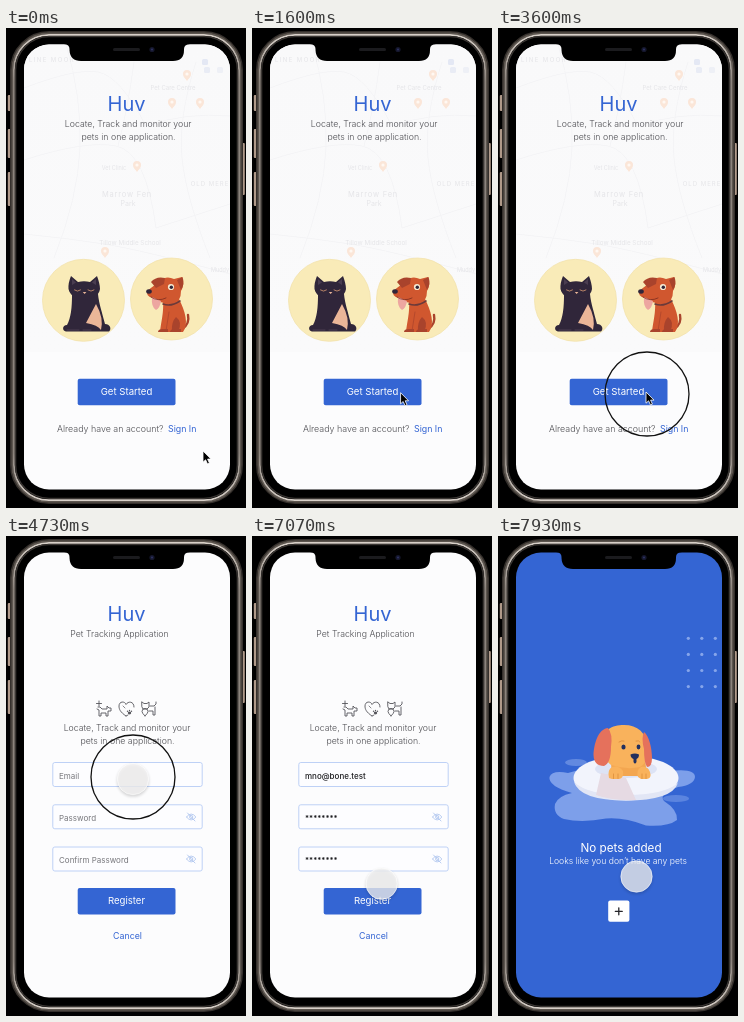
These frames come from a looping animation (240x480 px, 8 s). An HTML page:

```html
<!DOCTYPE html>
<html lang="en">
<head>
<meta charset="utf-8">
<title>Pet tracking app</title>
<style>
  html, body { margin: 0; width: 100%; height: 100%; overflow: hidden; background: #000; }
  svg { display: block; width: 100vw; height: 100vh; font-family: Inter, "Open Sans", sans-serif; }
</style>
</head>
<body>
<svg id="stage" viewBox="0 0 240 480"></svg>
<script>
const BLUE = '#3465d3', INK = '#505055', PAPER = '#fcfcfd';
const stage = document.getElementById('stage');

const text = (s, x, y, size, fill = INK, anchor = 'middle', weight = 300, extra = '') =>
  `<text x="${x}" y="${y}" font-size="${size}" fill="${fill}" text-anchor="${anchor}" font-weight="${weight}" ${extra}>${s}</text>`;
const path = (d, fill, extra = '') => `<path d="${d}" fill="${fill}" ${extra}/>`;
const line = (d, stroke, width = 1) =>
  path(d, 'none', `stroke="${stroke}" stroke-width="${width}" stroke-linecap="round" stroke-linejoin="round"`);
const rect = (x, y, w, h, r, fill, extra = '') =>
  `<rect x="${x}" y="${y}" width="${w}" height="${h}" rx="${r}" fill="${fill}" ${extra}/>`;
const oval = (x, y, rx, ry, fill, extra = '') =>
  `<ellipse cx="${x}" cy="${y}" rx="${rx}" ry="${ry}" fill="${fill}" ${extra}/>`;
const dot = (x, y, r, fill, extra) => oval(x, y, r, r, fill, extra);
const group = (id, body, extra = '') => `<g id="${id}" ${extra}>${body}</g>`;
const backdrop = color => rect(17, 15, 208, 448, 0, color);

const button = (label, y, base) =>
  rect(71.7, y, 97.8, 26.6, 2, BLUE) + text(label, 120.5, base, 9.6, '#fff', 'middle', 400);

const pin = (x, y) =>
  path(`M${x} ${y + 6}C${x - 2} ${y + 3} ${x - 4} ${y + 2} ${x - 4} ${y - 1}a4 4 0 0 1 8 0C${x + 4} ${y + 2} ${x + 2} ${y + 3} ${x} ${y + 6}Z`, '#fbe6d8') +
  dot(x, y - 1, 1.6, '#fff8f2');

function map() {
  const label = (s, x, y, size, extra) => text(s, x, y, size, '#e5e5e8', 'middle', 400, extra);
  const roads = 'M18 60Q70 40 92 44T140 98Q180 84 224 88M60 16Q76 70 74 120T48 230M18 132Q80 112 110 118T150 200L224 176M128 34Q122 80 112 118M190 34Q172 90 176 130T204 230M18 206Q60 210 98 216T224 246';
  return rect(17, 15, 208, 309, 0, 'url(#mapFill)') +
    line(roads, '#f4f4f6', 1) +
    label('LINE MOOR', 46, 34, 6, 'letter-spacing="1.4"') +
    label('OLD MERE', 204, 158, 6, 'letter-spacing="1"') +
    label('Marrow Fen', 121, 169, 7.5, 'letter-spacing=".8"') +
    label('Park', 122, 178, 7) +
    label('Tillow Middle School', 124, 217, 6.3) +
    label('Pet Care Centre', 167, 62, 6) +
    label('Vet Clinic', 108, 142, 5.5) +
    label('Muddy', 214, 244, 5.5) +
    pin(181, 47) + pin(166, 75) + pin(194, 75) + pin(131, 138) + pin(99, 224) +
    rect(196, 31, 6, 6, 1.5, '#e4e8f4') + rect(198, 39, 6, 6, 1.5, '#e9ecf5') + rect(211, 39, 6, 6, 1.5, '#eef0f6');
}

function cat() {
  const dark = '#30263a', peach = '#ebb698';
  return dot(77.5, 272.3, 41, '#f9ebb8', 'stroke="#f3e3ad" stroke-width=".8"') +
    path('M66 267C66 279 65 290 61 297C56 297 56 303 60 303.5H103C106 301 104 296 99 296C96 284 93 276 92 266Z', dark) +
    path('M90 276L80 295Q92 297 95 302Q98 290 90 276Z', peach) +
    path('M65 248L72 254Q78 252.5 84 254L91 248Q94 256 94 261C93 268 86 271.5 78.5 271.5S64 268 62.5 261Q62 255 65 248Z', dark) +
    path('M66 251L70 254.5L66 257Z M90 251L86 254.5L90 257Z', '#4a3d50') +
    line('M68.5 262q3 2.4 6 0M82 262q3 2.4 6 0', '#d99a72', .8) +
    path('M76.8 264h3.6l-1.8 2Z', peach) +
    line('M61 302h12M77 302h8', '#5b4c60', .6);
}

function dog() {
  const red = '#d0572f', deep = '#a9432c';
  return dot(165.5, 271, 41, '#f9ebb8', 'stroke="#f3e3ad" stroke-width=".8"') +
    line('M176 301Q184 296 182 287', deep, 2.4) +
    path('M157 273C158 284 155 294 154 304H177C183 296 179 283 173 271Z', red) +
    path('M170 289Q177 294 172 304H166Q165 294 170 289Z', deep) +
    line('M163 284L160 303', deep, .7) +
    path('M141 263L154 253Q160 247 168 251L176 249Q179 256 175 263Q175 273 168 275Q156 277 146 270Q140 268 141 263Z', red) +
    path('M158 256L159 250Q150 248 145 254L150 260Z', deep) +
    path('M171 252L176.5 249Q179 256 175 262Z', deep) +
    path('M146 269L155 273Q154 280 150 282Q145 279 146 269Z', '#eda6a0') +
    oval(143, 263.5, 2.8, 2.2, '#30263a') +
    dot(165, 259, 3.1, '#f7ead2') + dot(165.3, 259.2, 1.7, '#30263a') +
    line('M145 269Q152 274 160 270', '#71291f', .7) +
    line('M157 276Q165 279 174 273', '#6b3a3a', 1.6) +
    path('M152 304q0-3 5-3h5v3ZM164 304q0-3 5-3h6v3Z', deep);
}

const welcome = () => backdrop(PAPER) + map() +
  text('Huv', 120.5, 83, 20, BLUE, 'middle', 400) +
  text('Locate, Track and monitor your', 122.2, 99, 8.75) +
  text('pets in one application.', 122.5, 112, 8.75) +
  cat() + dog() + button('Get Started', 350.7, 367.2) +
  text('Already have an account?', 51, 404, 8.9, INK, 'start') +
  text('Sign In', 162, 404, 8.8, BLUE, 'start', 400);

function petIcons() {
  const c = '#56565c';
  const paw = (x, y) => oval(x, y + 1, 1.7, 1.4, c) + [-2, 0, 2].map(d => dot(x + d, y - 1.6 + Math.abs(d) * .4, .7, c)).join('');
  return line('M92 171h2l2 2h5v-3l2 2h2v3h-3v5h-2v-3h-5v3h-2v-6l-2 -1M93 165v5M90.5 167.5h5', c, .9) +
    line('M120 180C114 176 113 173 113 170C113 165 119 165 120 168.5C122 165 128 165 128 171M120 180l2 -1', c, .9) +
    paw(123.5, 176) + line('M117 170l2 2', c, .7) +
    line('M136 166l2 1.5h3l2 -1.5v5l-2 2h-4l-1 -2ZM144 170h4l2 -2v-2M149 171v8h-2v-4h-4M139 180q-3 -3 -3 -4.5a3 3 0 0 1 6 0q0 1.5 -3 4.5', c, .9);
}

const eye = y =>
  line(`M180.5 ${y}q4.7 -6 9.4 0q-4.7 6 -9.4 0M181.5 ${y - 4}l7.5 8`, '#a9c0ee', .8) +
  dot(185.2, y, 1.6, 'none', 'stroke="#a9c0ee" stroke-width=".8"');

const field = (id, hint, value, y, base, size = 8, weight = 500) =>
  rect(46.8, y, 149.4, 24, 2, '#fdfdff', 'stroke="#b7ccf5" stroke-width=".9"') +
  group(id + 'Hint', text(hint, 53, base, 8, '#77777c', 'start', 400)) +
  group(id + 'Value', text(value, 53, base, size, '#1d1d20', 'start', weight));

const register = () => backdrop(PAPER) +
  text('Huv', 120.5, 85, 20, BLUE, 'middle', 400) +
  text('Pet Tracking Application', 113.5, 101, 8.75) + petIcons() +
  text('Locate, Track and monitor your', 121, 195, 8.75) +
  text('pets in one application.', 121.5, 207.8, 8.75) +
  field('email', 'Email', 'mno@bone.test', 226.5, 242.7) +
  field('pass', 'Password', '********', 268.8, 284.7, 7.3, 700) + eye(281) +
  field('confirm', 'Confirm Password', '********', 311, 326.8, 7.3, 700) + eye(323) +
  button('Register', 352, 368.4) +
  text('Cancel', 121.5, 402.5, 8.8, BLUE, 'middle', 400);

function puppy() {
  const pool = '#7d9fea', tan = '#f9b25c', coral = '#e5715c';
  return path('M51.5 241Q54 234 70 237L92 231Q130 222 172 235Q197 232 197 241Q196 249 180 251Q160 258 166 265Q180 274 179 284Q170 291 148 289.5Q126 281 108 282.5Q84 287 66 283Q55 279 57 268Q60 260 74 257Q50 250 51.5 241Z', pool) +
    oval(78, 226.5, 11, 3.5, '#6289e0') + oval(178, 262.5, 13, 3.6, '#5b84df') +
    oval(128, 242, 52.5, 22.5, '#f2f4fc') +
    path('M76 246Q90 259 128 259T180 247Q174 264.5 128 264.5T76 246Z', '#e2e6f5') +
    oval(128, 233, 31, 9, '#dde3f5') +
    path('M103 237L128 242L138 264Q114 265 98 259Z', '#e6dae3') +
    path('M112 214H146L149 240H114Z', '#f3a650') +
    path('M103 208C104 194 114 189 126 189C140 189 148 197 149 209Q151 226 142 231Q128 234 113 229Q103 222 103 208Z', tan) +
    path('M110 192C100 193 96 208 95.5 219Q96 230 106 230Q113 227 113 211Q115 198 110 192Z', coral) +
    path('M146 196C151 200 154 212 154 222Q154 231 149 231Q146 227 146 213Q143 202 146 196Z', coral) +
    oval(125.5, 211, 2.1, 2.5, '#24305e') + oval(140.5, 211, 1.9, 2.4, '#24305e') +
    line('M121 206q3 -2 5 -1M138 205q3 -1 4 1', '#d98a3c', .8) +
    path('M132.5 218.5Q137 216.5 141 218.5Q141 222 138.5 223V226Q137 229 135.5 226V223Q132.5 221.5 132.5 218.5Z', '#24305e') +
    path('M111 242Q109 234 114 231Q121 229 125 235Q126 242 121 243H114ZM140 241Q138 234 143 231Q150 230 152 236Q154 242 149 243H143Z', tan) +
    line('M115.5 238v4.5M120 238v4.5M144 238v4.5M148 238v4.5', '#dc8e3c', .8);
}

function empty() {
  let grid = '';
  for (let i = 0; i < 12; i++) grid += dot(190.3 + i % 3 * 13.5, 102.3 + Math.floor(i / 3) * 16.1, 1.6, '#86a5ea');
  return backdrop(BLUE) + grid + puppy() +
    text('No pets added', 123, 315.5, 11.7, '#fff', 'middle', 400) +
    text('Looks like you don’t have any pets', 120, 328, 8.65, '#fff') +
    rect(110.2, 364.6, 21.2, 21.2, 2, '#fff') + line('M117.3 375.3h7M120.8 371.8v7', '#26262b', 1.3);
}

// One rounded outline of the phone body, drawn inwards from its edge.
const rim = (inset, width, color) =>
  rect(4 + inset, 3 + inset, 233 - 2 * inset, 473 - 2 * inset, 39 - inset, '#000', `stroke="${color}" stroke-width="${width}"`);

const phone = () => rect(0, 0, 240, 480, 0, '#000') +
  [[67, 16], [101, 29], [144, 34]].map(([y, h]) => rect(1.8, y, 3, h, 1, '#b09a8a')).join('') +
  rect(236.2, 115, 2.6, 52, 1, '#b09a8a') +
  rim(.7, 1.4, '#35302c') + rim(2.2, 1.8, '#5d564f') + rim(3.9, 1.8, 'url(#metal)') + rim(5.6, 1.4, '#3a3633');

const notch = () =>
  path('M58 15V16Q63.5 16.5 63.5 21V22Q64 33 75 33H167Q178 33 178 22V21Q178 16.5 184 16V15Z', '#000') +
  rect(107, 20, 27, 3, 1.5, '#1b1b1e') + dot(146, 21.5, 2.6, '#15172c') + dot(146, 21.5, 1.1, '#2c3160');

stage.innerHTML = `<defs>
  <clipPath id="screen">${rect(18, 16.5, 206, 445, 25, '#fff')}</clipPath>
  <linearGradient id="mapFill" x2="0" y2="1"><stop stop-color="#f9f9fa"/><stop offset="1" stop-color="#fafafb"/></linearGradient>
  <linearGradient id="metal" x2="0" y2="1"><stop stop-color="#d8d0c8"/><stop offset=".1" stop-color="#8b837c"/><stop offset=".9" stop-color="#8b837c"/><stop offset="1" stop-color="#d8d0c8"/></linearGradient>
  <filter id="soft" x="-50%" y="-50%" width="200%" height="200%"><feGaussianBlur stdDeviation="1.6"/></filter>
</defs>` + phone() +
  `<g clip-path="url(#screen)">` + group('welcome', welcome()) + group('register', register()) + group('empty', empty()) + '</g>' + notch() +
  group('touch', dot(0, 1.6, 16, '#000', 'opacity=".16" filter="url(#soft)"') +
    dot(0, 0, 15.7, '#f4f3f3', 'fill-opacity=".76" stroke="#fff" stroke-opacity=".6" stroke-width="1"')) +
  group('arrow', path('M0 0V11.2L2.6 8.8L4.5 13L6.4 12.1L4.6 8.1H8Z', '#000', 'stroke="#fff" stroke-width=".8"')) +
  `<circle id="ring" r="42" fill="none" stroke="#111" stroke-width="1.3"/>`;

const LOOP = 8000;
const ARROW = [[0, 197, 423], [800, 165, 384], [1700, 148, 364]];
const TOUCH = [[0, 149, 368], [4400, 149, 368], [4530, 127, 243], [5330, 127, 243], [5730, 127, 284],
  [6399, 127, 284], [6400, 127, 337], [6530, 127, 325], [6930, 127, 325], [7200, 132, 367.5], [7480, 132, 367.5], [7860, 138.5, 340.5]];
const TAPS = [3530, 4730, 5930, 6600, 7200];

const ramp = (t, from, to) => Math.min(1, Math.max(0, (t - from) / (to - from)));
const smooth = p => p * p * (3 - 2 * p);
const $ = id => document.getElementById(id);
const fade = (id, value) => $(id).setAttribute('opacity', value);
const move = (id, [x, y]) => $(id).setAttribute('transform', `translate(${x} ${y})`);

function along(keys, t) {
  let i = 0;
  while (i < keys.length - 2 && t >= keys[i + 1][0]) i++;
  const [a, ax, ay] = keys[i], [b, bx, by] = keys[i + 1];
  const p = smooth(ramp(t, a, b));
  return [ax + (bx - ax) * p, ay + (by - ay) * p];
}

function fill(id, p) {
  fade(id + 'Hint', 1 - p);
  fade(id + 'Value', p);
}

function draw(t) {
  const touching = t >= 3730, spot = along(TOUCH, t);
  const form = ramp(t, 3730, 4030), done = ramp(t, 7280, 7550);
  // Covered screens are hidden so they do not bleed through the rounded edge.
  fade('welcome', form < 1 ? 1 : 0);
  fade('register', done < 1 ? form : 0);
  fade('empty', done);
  fill('email', ramp(t, 4900, 5200));
  fill('pass', t < 6400 ? 0 : ramp(t, 6200, 6480));
  fill('confirm', ramp(t, 6720, 7000));

  move('arrow', along(ARROW, t));
  move('touch', spot);
  fade('arrow', touching ? 0 : 1);
  fade('touch', touching ? 1 : 0);
  move('ring', [spot[0], spot[1] - 2]);
  fade('ring', TAPS.some(s => t >= s && t < s + 140) ? 1 : 0);
}

const start = performance.now();
function tick() {
  draw((performance.now() - start) % LOOP);
  requestAnimationFrame(tick);
}
tick();
</script>
</body>
</html>
```
